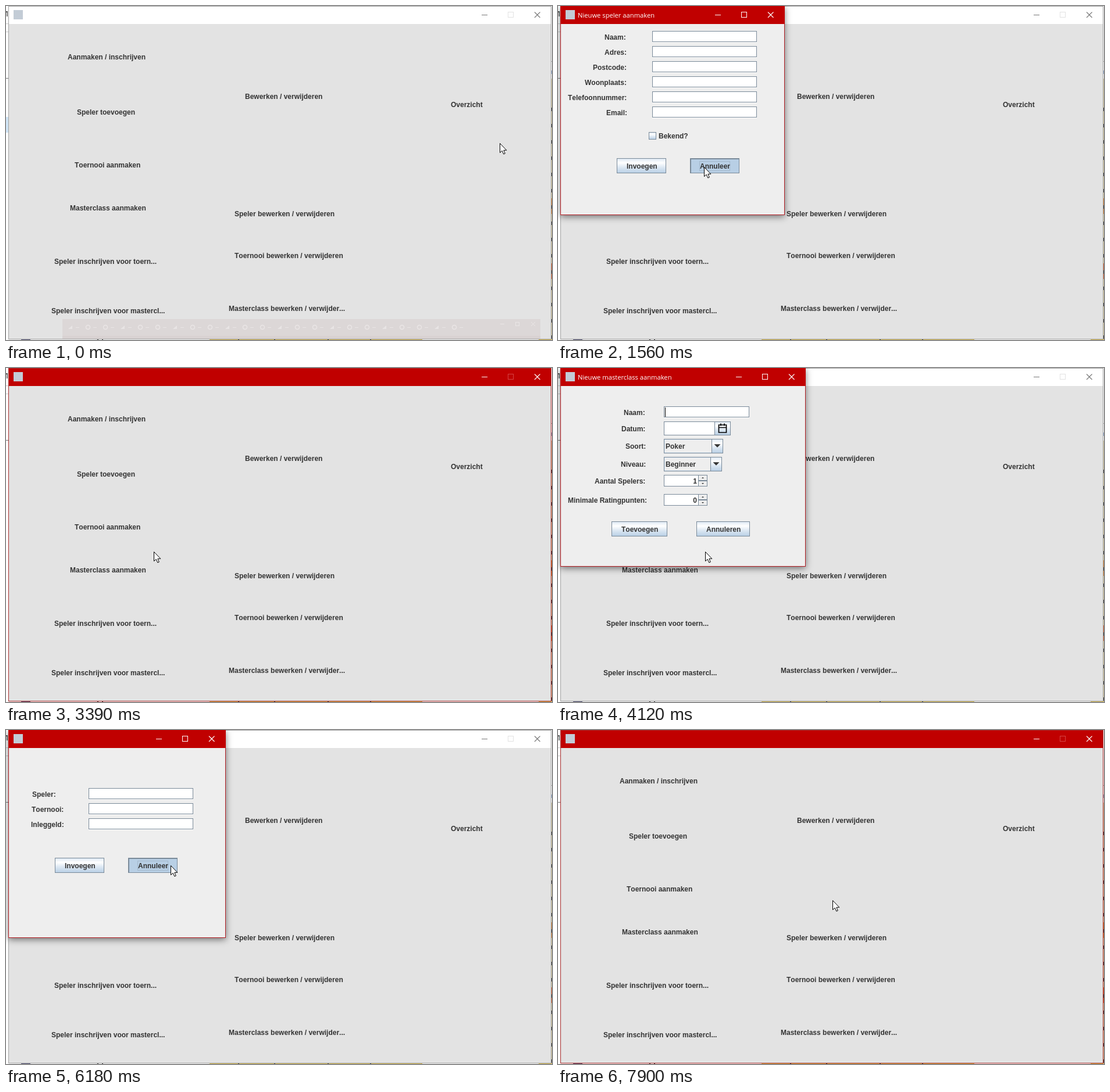
Write an HTML page that moves like this. It is 939x575 px and loops after 7.99 s.

```html
<!DOCTYPE html>
<html lang="nl">
<head>
<meta charset="utf-8">
<title>Toernooibeheer</title>
<style>
  html, body { margin: 0; width: 100%; height: 100%; overflow: hidden; background: #fff; }
  svg { display: block; width: 939px; height: 575px; }
  text { font: bold 12px "Liberation Sans", Arial, sans-serif; font-kerning: none; fill: #333; white-space: pre; }
  text.title { font: 11.2px "Open Sans", sans-serif; fill: #fff; }
  rect, .crisp { shape-rendering: crispEdges; }
  .shadow { filter: drop-shadow(0 3px 6px rgba(0, 0, 0, .5)); }
</style>
</head>
<body>
<svg id="stage" viewBox="0 0 939 575" xmlns="http://www.w3.org/2000/svg"></svg>
<script>
const LOOP = 7990, TICK = 78.3;
const RED = '#c00000', EDGE = '#7a8a99', PRESSED = '#b8cfe5';

// ---- drawing helpers ----
const rect = (x, y, w, h, fill, extra = '') =>
  `<rect x="${x}" y="${y}" width="${w}" height="${h}" fill="${fill}" ${extra}/>`;
const box = (x, y, w, h, fill, stroke = EDGE, extra = '') =>
  rect(x + .5, y + .5, w - 1, h - 1, fill, `stroke="${stroke}" ${extra}`);
const label = (x, middle, s, extra = '') => `<text x="${x}" y="${middle + 4}" ${extra}>${s}</text>`;
const path = (d, extra) => `<path d="${d}" ${extra}/>`;

const icon = () => rect(13, 7, 16, 16, '#c3ccd6');

function windowButtons(right, color, maxColor = color) {
  const min = right - 119, max = right - 74, x = right - 28;
  return rect(min, 15, 10, 1, color, 'class="mark"') +
    box(max, 10, 10, 10, 'none', maxColor, 'class="max"') +
    path(`M${x} 10.5l9.5 9.5m0-9.5l-9.5 9.5`, `class="x" fill="none" stroke="${color}" stroke-width="1.1"`);
}

const field = (x, y, w, h = 19) => box(x, y, w, h, '#fff') +
  path(`M${x} ${y + h + .5}h${w}`, 'class="crisp" stroke="#fff"');

function button(x, y, w, textX, s, cancel) {
  const textW = w - 33;
  return `<g${cancel ? ' class="cancel"' : ''}>` +
    box(x, y, w, 26, 'url(#metal)', EDGE, 'class="face"') +
    path(`M${x + 1} ${y + 24.5}V${y + 1.5}H${x + w - 1}`,
      `class="crisp sunk" fill="none" stroke="${EDGE}" visibility="hidden"`) +
    box(x + 16, y + 5, textW + 1, 17, 'none', '#a3b8cc', 'class="focus" visibility="hidden"') +
    label(textX, y + 14, s) + '</g>';
}

const arrow = (x, y, s, dir = 1) =>
  path(`M${x - s} ${y - dir * s / 2}h${2 * s}l${-s} ${dir * s}z`, 'fill="#333"');

const combo = (x, y, w, s) => box(x, y, w, 25, '#eee') +
  box(x + 1, y + 1, w - 2, 23, 'none', '#dbe6f1') +
  box(x + w - 20, y, 20, 25, 'url(#metal)') +
  arrow(x + w - 10, y + 12, 5.5) + label(x + 3, y + 13, s);

const spinner = (x, y, s) => box(x, y, 60, 20, '#fff') +
  box(x + 59, y, 16, 10, '#eee') + box(x + 59, y + 10, 16, 10, '#eee') +
  arrow(x + 67, y + 5, 2, -1) + arrow(x + 67, y + 15, 2) +
  label(x + 57, y + 11, s, 'text-anchor="end"');

const datePicker = (x, y, w) => box(x, y, w + 1, 24, '#fff') +
  box(x + w, y, 28, 24, 'url(#metal)') +
  path(`M${x + w + 7.5} ${y + 6}h13v13h-13zm0 4.5h13m-9.5-7v4m6-4v4`,
    'fill="none" stroke="#000" stroke-width="1.7"');

const caret = (x, y) => rect(x, y, 1, 16, '#000', 'class="caret"');

// each entry: [x, y, text]
const labels = list => list.map(a => label(...a)).join('');

function dialog(title, right, bottom, body) {
  return `<g class="dialog" visibility="hidden">` +
    rect(4, 0, right - 3, bottom + 1, '#eee', 'class="shadow"') +
    box(4, 0, right - 3, bottom + 1, '#eee', '#b01a20') +
    rect(4, 0, right - 3, 31, RED) + icon() +
    `<text class="title" x="34" y="20">${title}</text>` +
    windowButtons(right, '#fff') + body + '</g>';
}

// ---- dialogs ----
const playerForm = ['Naam:', 'Adres:', 'Postcode:', 'Woonplaats:', 'Telefoonnummer:', 'Email:'];
const playerX = [80, 80, 60, 46, 17, 83];

const enroll = (right, x, names, shift) => dialog('', right, 357,
  names.map(([lx, s], i) => label(lx, 111 + 26 * i, s) + field(x, 100 + 26 * i, 180)).join('') +
  caret(x + 2, 102) +
  button(84 + shift, 220, 85, 101 + shift, 'Invoegen') +
  button(210 + shift, 220, 85, 227 + shift, 'Annuleer', true));

const dialogs = [
  { open: 800, press: 1480, release: 1640, close: 1640, svg: dialog('Nieuwe speler aanmaken', 389, 359,
      playerForm.map((s, i) => label(playerX[i], 54 + 26 * i, s) + field(162, 43 + 26 * i, 180)).join('') +
      caret(164, 45) +
      box(156, 217, 13, 13, 'url(#metal)') + label(173, 224, 'Bekend?') +
      button(101, 262, 85, 118, 'Invoegen') + button(227, 262, 85, 244, 'Annuleer', true)) },
  { open: 2190, press: 3000, release: 3230, close: 3230, svg: dialog('Nieuwe toernooi aanmaken', 368, 337,
      labels([[57, 74, 'Naam:'], [57, 102, 'Datum:'], [58, 132, 'Plaats:'], [64, 160, 'Soort:'],
        [51, 191, 'Rondes:'], [11, 225, 'Aantal Spelers:']]) +
      field(138, 63, 205) + caret(140, 65) + datePicker(138, 89, 101) + field(138, 121, 205) +
      combo(138, 147, 102, 'Poker') + combo(138, 178, 35, '1') + spinner(138, 214, '1') +
      button(81, 271, 96, 98, 'Toevoegen') + button(226, 271, 92, 243, 'Annuleren', true)) },
  { open: 3720, press: 4520, release: 4690, close: 4840, svg: dialog('Nieuwe masterclass aanmaken', 425, 341,
      labels([[113, 77, 'Naam:'], [109, 105, 'Datum:'], [116, 135, 'Soort:'], [108, 166, 'Niveau:'],
        [63, 195, 'Aantal Spelers:'], [17, 228, 'Minimale Ratingpunten:']]) +
      field(182, 66, 147) + caret(184, 68) + datePicker(182, 92, 87) +
      combo(182, 122, 102, 'Poker') + combo(182, 153, 100, 'Beginner') +
      spinner(182, 184, '1') + spinner(182, 217, '0') +
      button(92, 264, 96, 109, 'Toevoegen') + button(238, 264, 92, 255, 'Annuleren', true)) },
  { open: 5390, press: 6100, release: 6260, close: 6260, svg: enroll(377, 142,
      [[45, 'Speler:'], [44, 'Toernooi:'], [43, 'Inleggeld:']], 0) },
  { open: 6640, press: 7190, release: 7350, close: 7350, svg: enroll(382, 147,
      [[90, 'Speler:'], [55, 'Masterclass:'], [56, 'Inschrijfgeld:']], 5) }
];

// ---- desktop slivers around the main window ----
function desktop() {
  let s = rect(0, 0, 939, 575, '#fff') +
    rect(0, 9, 3, 2, '#555') + rect(1, 11, 2, 7, '#777') +
    rect(0, 30, 4, 1, '#ccc') + rect(0, 44, 4, 1, '#ccc') + rect(0, 124, 4, 1, '#777') +
    rect(0, 191, 4, 27, '#cfe4f5', 'id="highlight"') +
    rect(938, 95, 1, 1, '#999') + rect(938, 111, 1, 6, '#8fa8cc') + rect(938, 125, 1, 450, '#d8cba0') +
    rect(938, 331, 1, 27, '#cf7a2c') + rect(938, 443, 1, 27, '#cf5a2c');
  for (let y = 175; y < 575; y += 28) s += rect(937, y, 2, 6, '#333');
  s += rect(350, 574, 366, 1, '#d6b74a') + rect(916, 574, 23, 1, '#d6b74a') + rect(26, 574, 16, 1, '#557');
  for (const x of [157, 165, 399, 461, 553, 626]) s += rect(x, 574, 2, 1, '#333');
  return s;
}

function ghostBar() {
  let s = rect(97, 539, 822, 34, '#dcd7d7') + rect(97, 568, 822, 5, '#d8d1d1');
  for (let i = 0; i < 23; i++) {
    const x = 111 + 30 * i;
    s += i % 3 ? `<circle cx="${x}" cy="553" r="3.5" fill="none" stroke="#eae6e6" stroke-width="1.5"/>`
               : path(`M${x - 4} 556l7-6v6z`, 'fill="#e8e4e4"');
    s += rect(x + 9, 553, 6, 1, '#e8e4e4');
  }
  return s + rect(850, 547, 7, 1, '#eae6e6') + box(876, 544, 7, 7, 'none', '#eae6e6') +
    path('M903 544l7 7m0-7l-7 7', 'stroke="#eae6e6"');
}

const menu = [
  [106, 88, 'Aanmaken / inschrijven'], [122, 183, 'Speler toevoegen'], [118, 274, 'Toernooi aanmaken'],
  [110, 348, 'Masterclass aanmaken'], [83, 440, 'Speler inschrijven voor toern...'],
  [78, 525, 'Speler inschrijven voor mastercl...'], [411, 156, 'Bewerken / verwijderen'],
  [393, 358, 'Speler bewerken / verwijderen'], [393, 430, 'Toernooi bewerken / verwijderen'],
  [383, 521, 'Masterclass bewerken / verwijder...'], [765, 170, 'Overzicht']
];

const stage = document.getElementById('stage');
stage.innerHTML = `<defs><linearGradient id="metal" x2="0" y2="1">
  <stop stop-color="#dde8f3"/><stop offset=".3" stop-color="#fff"/>
  <stop offset=".6" stop-color="#dde8f3"/><stop offset="1" stop-color="#b8cfe5"/></linearGradient></defs>` +
  desktop() +
  `<g id="main">` + rect(4, 0, 934, 574, '#e3e3e3') + rect(4, 0, 934, 31, '#fff', 'id="bar"') +
  box(4, 0, 934, 574, 'none', '#a0a0a0', 'id="frame"') + icon() + windowButtons(937, '#777', '#e2e2e2') + '</g>' +
  `<g id="ghost">${ghostBar()}</g>` + labels(menu) +
  dialogs.map(d => d.svg).join('') +
  `<g id="pointer">` + path('M.5 .5V16.5L4.2 13.2L6.8 19L9.3 18L6.9 12.3H11.8Z',
    'fill="#fff" stroke="#000" stroke-linejoin="round"') + '</g>';

const $ = id => document.getElementById(id);
const show = (el, on) => el.setAttribute('visibility', on ? 'inherit' : 'hidden');
const main = $('main');
const mainMarks = { min: main.querySelector('.mark'), max: main.querySelector('.max'), x: main.querySelector('.x') };
stage.querySelectorAll('.dialog').forEach((el, i) => {
  const q = s => el.querySelector(s);
  Object.assign(dialogs[i], { el, caret: q('.caret'), face: q('.cancel .face'),
    sunk: q('.cancel .sunk'), focus: q('.cancel .focus') });
});

// pointer way points, one leg per row: start time, end time, x, y
const legs = [
  [0, 0, 849, 236], [0, 157, 480, 292], [235, 548, 203, 200], [940, 1096, 232, 248],
  [1180, 1409, 251, 277], [1640, 1957, 200, 274], [2430, 2740, 262, 277], [3230, 3445, 250, 338],
  [3990, 4110, 254, 305], [4110, 4190, 260, 293], [4300, 4375, 260, 290], [4840, 5230, 250, 459],
  [5710, 5870, 288, 240], [5960, 6030, 283, 233], [6260, 6570, 240, 530], [6720, 6950, 255, 447],
  [6970, 7120, 262, 235], [7350, 7590, 290, 260], [7590, 7750, 390, 330], [7750, 7900, 472, 293]
];

function pointerAt(t) {
  const now = Math.floor(t / TICK + .25) * TICK;
  let x = legs[0][2], y = legs[0][3];
  for (const [from, to, tx, ty] of legs) {
    if (now < from) break;
    const k = to > from ? Math.min(1, (now - from) / (to - from)) : 1;
    x += (tx - x) * k;
    y += (ty - y) * k;
    if (k < 1) break;
  }
  return [Math.round(x), Math.round(y)];
}

function paintMain(active) {
  $('bar').setAttribute('fill', active ? RED : '#fff');
  $('frame').setAttribute('stroke', active ? '#a52a2a' : '#a0a0a0');
  mainMarks.min.setAttribute('fill', active ? '#fff' : '#777');
  mainMarks.x.setAttribute('stroke', active ? '#fff' : '#777');
  mainMarks.max.setAttribute('stroke', active ? '#d64545' : '#e2e2e2');
}

function update(t) {
  let busy = false;
  for (const d of dialogs) {
    const open = t >= d.open && t < d.close;
    const opacity = open ? Math.min(1, .4 + (t - d.open) / 200) : 1 - (t - d.close) / 110;
    const visible = t >= d.open && opacity > 0;
    busy = busy || open;
    show(d.el, visible);
    if (!visible) continue;
    const down = t >= d.press && t < d.release, focused = t >= d.press;
    d.el.setAttribute('opacity', opacity);
    d.face.setAttribute('fill', down ? PRESSED : 'url(#metal)');
    show(d.sunk, down);
    show(d.focus, focused);
    show(d.caret, !focused && (t - d.open) % 960 < 480);
  }
  paintMain(t >= 720 && !busy);
  show($('ghost'), t < 90);
  show($('highlight'), t < 90);
  $('pointer').setAttribute('transform', `translate(${pointerAt(t)})`);
}

const start = performance.now();
function tick() {
  update((performance.now() - start) % LOOP);
  requestAnimationFrame(tick);
}
tick();
</script>
</body>
</html>
```
